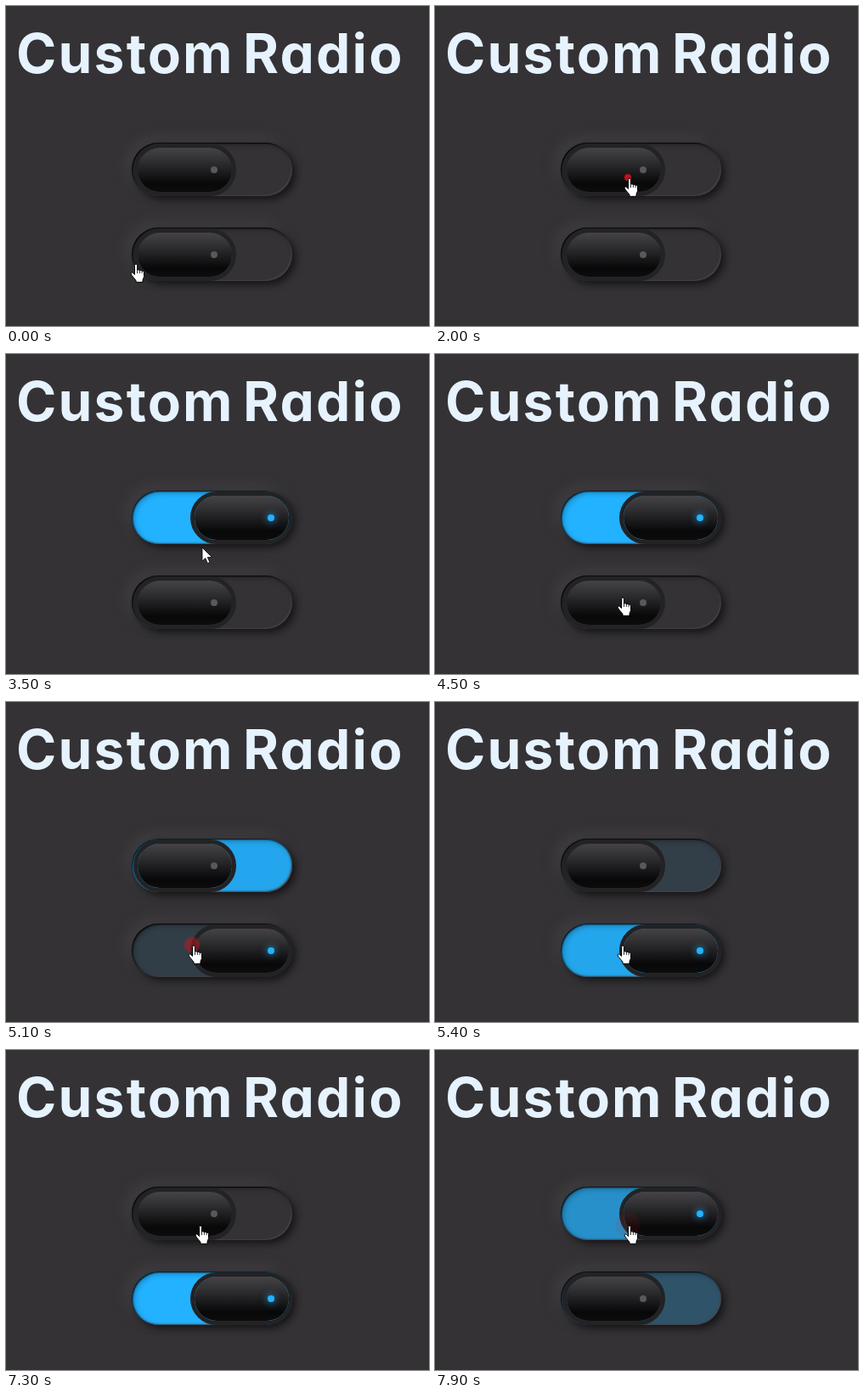
Animation of 498 by 377 pixels, one loop 8000 ms. Source, as an HTML page:

```html
<!DOCTYPE html>
<html lang="en">
<head>
<meta charset="utf-8">
<title>Custom Radio</title>
<style>
  html, body { margin: 0; width: 100%; height: 100%; overflow: hidden; background: #343235; }
  svg { position: absolute; left: 0; top: 0; overflow: visible; }
  .title {
    font: 700 64px Inter, "Open Sans", sans-serif;
    font-feature-settings: "cv11";
    letter-spacing: 2.2px;
    word-spacing: -7px;
    fill: #e6f3ff;
  }
  .track {
    position: absolute; left: 148px; width: 189px; height: 63px;
    border-radius: 32px;
    box-shadow:
      4px 4px 8px #151416,
      -6px -6px 15px #403e41,
      inset 1px 1px 2px #000,
      inset 3px 3px 6px rgba(0, 0, 0, .25),
      inset -1px -1px 2px #4c4a4d;
  }
  .thumb {
    position: absolute; left: 2px; top: 1px; width: 111px; height: 52px;
    border: 5px solid #232224;
    border-radius: 31px;
    background: linear-gradient(#454346, #333234 25%, #1c1b1d 55%, #080809 80%, #0c0c0d) padding-box;
  }
  .lamp {
    position: absolute; left: 86px; top: 22px; width: 8px; height: 8px;
    border-radius: 50%;
    background: #59585b;
  }
  .on .thumb { left: 69px; }
  .on .lamp { background: #22b2ff; box-shadow: 0 0 8px 1px rgba(34, 178, 255, .65); }
</style>
</head>
<body>
<div class="track" style="top:161px"><div class="thumb"><div class="lamp"></div></div></div>
<div class="track" style="top:261px"><div class="thumb"><div class="lamp"></div></div></div>
<svg width="498" height="377" viewBox="0 0 498 377">
  <text class="title" x="12" y="79">Custom Radio</text>
  <circle id="ripple" fill="#d8101c"/>
  <g id="cursor" stroke="#000" stroke-linejoin="round">
    <g id="hand" transform="translate(-6.5 -.5)">
      <path fill="#fff" d="M5 2a1.5 1.5 0 0 1 3 0v6c.3-1.2 2.8-1 2.9.4.5-.9 2.6-.6 2.7.7.6-.7 2.4-.4 2.4 1.2v4.5c0 2-1.5 3-1.5 5v2H6.5v-1.8C5.5 18 2 15 .8 12.4c-.8-1.6 1-2.6 2.2-1.4L5 13z"/>
      <path fill="none" stroke-width=".8" d="M8 8v3.5M10.9 8.5v3M13.6 9.3v2.4"/>
    </g>
    <path id="arrow" fill="#fff" stroke-width=".8" d="M0 0v16l3.7-3.5 2.6 6 2.6-1.1-2.6-5.9h5.2z"/>
  </g>
</svg>
<script>
  const LOOP = 8000, STEP = 100;
  const CLICKS = [2000, 4900, 7500];
  const RELEASE = 180, FADE = 500, RIPPLE = 500;
  // time, x, y of the pointer tip
  const PATH = [
    [500, 153, 304], [1300, 229, 203], [3000, 229, 203],
    [3500, 231, 228], [3900, 223, 258], [4500, 221, 287],
    [5900, 221, 287], [6800, 225, 242], [7300, 229, 207]
  ];

  const $ = id => document.getElementById(id);
  const tracks = [...document.querySelectorAll('.track')];
  const ripple = $('ripple'), cursor = $('cursor'), hand = $('hand'), arrow = $('arrow');

  const clamp = v => Math.min(1, Math.max(0, v));
  const mix = (a, b, p) => a + (b - a) * p;
  const easeOut = p => 1 - Math.pow(1 - p, 2.3);
  const smooth = p => p * p * (3 - 2 * p);

  function pointer(t) {
    const next = PATH.findIndex(key => key[0] > t);
    if (next === 0) return PATH[0].slice(1);
    if (next < 0) return PATH[PATH.length - 1].slice(1);
    const [t0, x0, y0] = PATH[next - 1], [t1, x1, y1] = PATH[next];
    let p = (t - t0) / (t1 - t0);
    if (next === 1) p = smooth(p);
    return [mix(x0, x1, p), mix(y0, y1, p)];
  }

  function drawTracks(t) {
    const done = CLICKS.filter(c => t >= c + RELEASE);
    const active = done.length ? (done.length - 1) % 2 : -1;
    const p = done.length ? easeOut(clamp((t - done[done.length - 1] - RELEASE) / FADE)) : 0;
    tracks.forEach((track, i) => {
      const tint = i === active ? p : done.length > 1 ? 1 - p : 0;
      track.classList.toggle('on', i === active);
      track.style.backgroundColor = `rgba(34, 178, 255, ${tint})`;
    });
  }

  function drawRipple(t) {
    const click = CLICKS.find(c => t >= c && t < c + RIPPLE);
    ripple.style.display = click === undefined ? 'none' : '';
    if (click === undefined) return;
    const [x, y] = pointer(click), p = (t - click) / RIPPLE;
    ripple.setAttribute('cx', x - 2);
    ripple.setAttribute('cy', y - 1);
    ripple.setAttribute('r', mix(4, 17, p));
    ripple.setAttribute('opacity', .9 * Math.pow(1 - p, 1.4));
  }

  function drawCursor(t) {
    const [x, y] = pointer(t);
    const over = (y >= 161 && y <= 224) || (y >= 261 && y <= 324);
    cursor.setAttribute('transform', `translate(${Math.round(x)} ${Math.round(y)})`);
    hand.style.display = over ? '' : 'none';
    arrow.style.display = over ? 'none' : '';
  }

  const start = performance.now();
  function frame() {
    const elapsed = (performance.now() - start) % LOOP;
    const t = Math.floor(elapsed / STEP) * STEP;
    drawTracks(t);
    drawRipple(t);
    drawCursor(t);
    requestAnimationFrame(frame);
  }
  frame();
</script>
</body>
</html>
```
